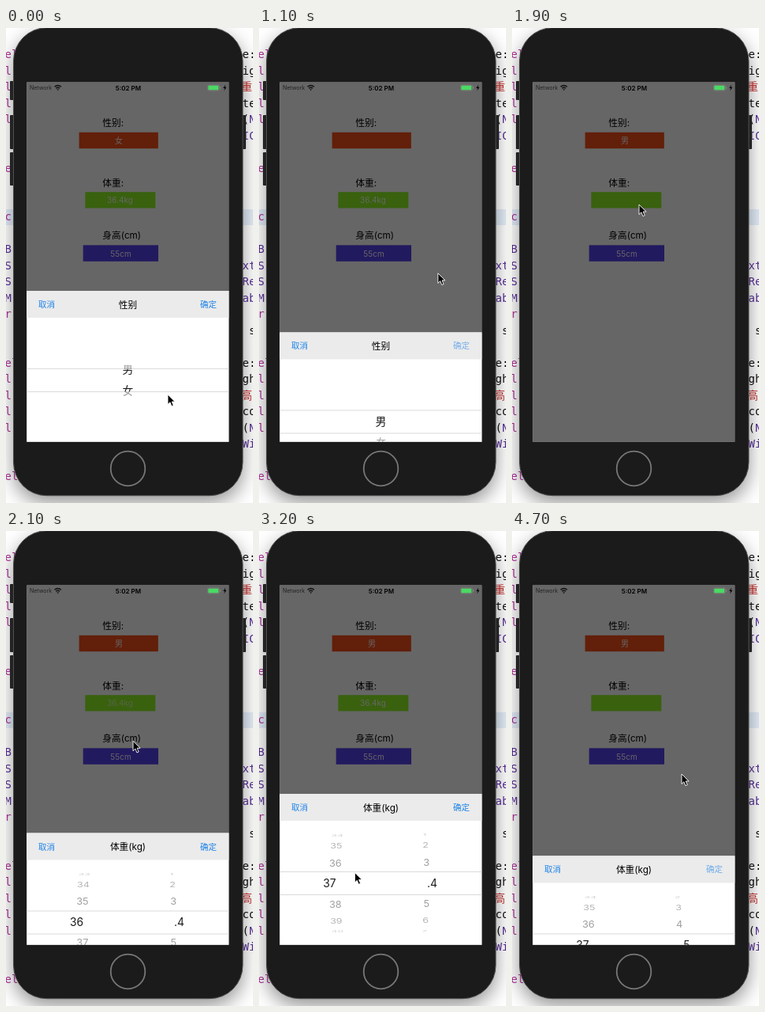
An HTML page that plays this animation: 313x600 px, repeating every 4.8 s.

```html
<!DOCTYPE html>
<html lang="zh">
<head>
<meta charset="utf-8">
<title>Picker demo</title>
<style>
  html, body { margin: 0; width: 100%; height: 100%; overflow: hidden; background: #fff; }
  svg { display: block; width: 100vw; height: 100vh; }
  text { font-family: Inter, "Noto Sans CJK SC", "Noto Sans CJK", sans-serif; white-space: pre; }
  .code text { font: 500 14px "DejaVu Sans Mono", "Noto Sans CJK SC", "Noto Sans CJK", monospace; }
  .mid { text-anchor: middle; }
  .label { font-size: 11.7px; }
  .value { font-size: 10px; fill: #fff; text-anchor: middle; }
  .action { font-size: 10.5px; fill: #1b82e8; }
</style>
</head>
<body>
<svg viewBox="0 0 313 600" xmlns="http://www.w3.org/2000/svg">
  <defs>
    <filter id="shadow" x="-20%" y="-10%" width="140%" height="125%" color-interpolation-filters="sRGB">
      <feDropShadow dx="0" dy="9" stdDeviation="12" flood-color="#000" flood-opacity=".42"/>
    </filter>
    <clipPath id="screen"><rect x="26.300" y="68.500" width="256" height="454.200"/></clipPath>
    <clipPath id="band"><rect x="26" y="431" width="257" height="28"/></clipPath>
    <clipPath id="offBand"><path d="M26 366h257v65H26zM26 459h257v64H26z"/></clipPath>
  </defs>

  <rect width="313" height="600" fill="#fff"/>
  <rect y="229" width="313" height="20" fill="#e4eefa"/>
  <g class="code" id="code"></g>

  <g fill="#2c2c2c">
    <rect x="5" y="67" width="6" height="24" rx="1"/>
    <rect x="5" y="110" width="6" height="43" rx="1"/>
    <rect x="5" y="157" width="6" height="42" rx="1"/>
    <rect x="298" y="110" width="6" height="43" rx="1"/>
  </g>
  <rect x="9.500" y="-.3" width="290.500" height="591" rx="42" fill="#1b1b1b" stroke="#505050" filter="url(#shadow)"/>
  <circle cx="154.500" cy="556.500" r="21.800" fill="none" stroke="#777" stroke-width="1.800"/>

  <g clip-path="url(#screen)">
    <rect x="26" y="68" width="257" height="455" fill="#fff"/>
    <g class="label">
      <text x="122.300" y="123.500">性别:</text>
      <text x="122.300" y="199.500">体重:</text>
      <text x="122.300" y="266">身高(cm)</text>
    </g>
    <rect x="92.600" y="131.800" width="100.200" height="20.400" fill="#f54d18"/>
    <rect x="100.400" y="207.200" width="88.900" height="20.300" fill="#8ef422"/>
    <rect x="97.700" y="274.300" width="95.300" height="20.500" fill="#5540ee"/>
    <text id="gender" class="value" x="143" y="146"></text>
    <text id="weight" class="value" x="144.500" y="221"></text>
    <text class="value" x="145.500" y="288.500">55cm</text>
    <rect id="dim" x="26" y="68" width="257" height="455" opacity=".6"/>

    <text x="30" y="78.300" font-size="7" fill="#222">Network</text>
    <path d="M61.500 74.300q4.200-3.700 8.400 0M63.300 76.200q2.400-2 4.800 0" fill="none" stroke="#111" stroke-width="1.500"/>
    <path d="M64.300 77.400h2.800l-1.400 1.700z"/>
    <text class="mid" x="155" y="78.500" font-size="8" font-weight="600">5:02 PM</text>
    <rect x="255.500" y="72" width="15" height="7" rx="1.500" fill="none" stroke="#888" stroke-width=".5"/>
    <rect x="256.300" y="72.800" width="13" height="5.400" rx=".8" fill="#4bd964"/>
    <path d="M271.600 74.300v2.400" stroke="#888"/>
    <path d="M278.200 71.500l-3 4.500h2l-1 3.500 3.200-4.700h-2z"/>

    <g id="sheet">
      <rect x="26" y="332" width="257" height="191" fill="#fff"/>
      <rect x="26" y="332" width="257" height="34" fill="#ebebeb"/>
      <text class="action" x="41" y="353">取消</text>
      <text id="title" class="label mid" x="154.500" y="353.500"></text>
      <text id="confirm" class="action" x="246" y="353">确定</text>
      <path d="M26 430.500h257M26 459.500h257" stroke="#dadada"/>
      <g id="outer" clip-path="url(#offBand)"></g>
      <g id="inner" clip-path="url(#band)"></g>
    </g>
  </g>

  <path id="cursor" d="M0 0v12.500l2.900-2.700 2 4.900 2.300-1-2-4.700h3.900z" fill="#000" stroke="#fff" stroke-width=".9" stroke-linejoin="round"/>
</svg>
<script>
const LOOP = 4800, STEP = 100, CENTER_X = 154.5, CENTER_Y = 444.7, SHEET_H = 191;
const $ = id => document.getElementById(id);

// Editor text peeking out at both sides of the phone.
const pink = '#b0309a', violet = '#5a3099', ink = '#111', red = '#c9302c';
const codeLine = (x, row, text, color) =>
  `<text x="${x}" y="${(38 + row * 20.5).toFixed(1)}" fill="${color}">${text}</text>`;
const leftRows = { 0: 'el', 1: 'l', 2: 'l', 3: 'l', 4: 'l', 7: 'e', 10: 'c', 16: 'r',
  19: 'el', 20: 'l', 21: 'l', 22: 'l', 23: 'l', 26: 'el' };
const leftTypes = { 12: 'B', 13: 'S', 14: 'S', 15: 'M' };
const rightRows = { 0: 'e:', 1: 'ig', 3: 'te', 4: '(', 17: ' s', 19: 'e:', 20: 'gh', 22: 'co', 23: '(' };
const rightTypes = { 4: ' N', 5: 'IC', 13: 'xt', 14: 'Re', 15: 'ab', 23: ' N', 24: 'Wi' };
const rightStrings = { 2: '重', 21: '高' };
const column = (x, rows, color) =>
  Object.entries(rows).map(([row, text]) => codeLine(x, +row, text, color)).join('');
$('code').innerHTML = column(-1.5, leftRows, pink) + column(-1.5, leftTypes, violet) +
  column(299.5, rightRows, ink) + column(299.5, rightTypes, violet) + column(298, rightStrings, red);

// Eased interpolation through [time, ...values] keys.
function track(t, keys) {
  if (t <= keys[0][0]) return keys[0].slice(1);
  for (let i = 1; i < keys.length; i++) {
    const [a, ...from] = keys[i - 1], [b, ...to] = keys[i];
    if (t <= b) {
      const p = (t - a) / (b - a), e = p * p * (3 - 2 * p);
      return from.map((v, k) => v + (to[k] - v) * e);
    }
  }
  return keys[keys.length - 1].slice(1);
}

const pointer = [[0, 205, 463], [200, 206, 473], [800, 252, 348], [950, 252, 348],
  [1300, 188, 251], [1600, 161, 223], [1950, 161, 223], [2400, 161, 386],
  [2750, 102, 462], [3100, 102, 430], [3500, 226, 440], [3900, 237, 389], [4050, 237, 389],
  [4350, 254, 348], [4500, 254, 348], [4700, 215, 307], [4900, 170, 240]];
const genderPos = [[-300, 1], [300, 0]];
const kiloPos = [[2750, 36], [3250, 37]];
const gramPos = [[3500, 4], [3950, 5.04], [4150, 5]];
const sheetShift = [[1000, 0], [1290, SHEET_H], [1900, SHEET_H], [2200, 0], [4568, 0], [4868, SHEET_H]];
const confirmAlpha = [[800, 1], [850, .15], [950, .15], [1250, 1],
  [4350, 1], [4450, .15], [4560, .15], [4830, 1]];
const genderAlpha = [[940, 1], [960, 0], [1100, 0], [1350, 1]];
const weightAlpha = [[1780, 1], [1850, 0], [1950, 0], [2200, 1], [4540, 1], [4570, 0], [4720, 0], [4900, 1]];

const wheelText = (x, y, sx, sy, size, label, alpha) =>
  `<text class="mid" transform="translate(${x.toFixed(2)} ${y.toFixed(2)}) scale(${sx.toFixed(3)} ${sy.toFixed(3)})"` +
  ` y=".36em" font-size="${size}" opacity="${alpha.toFixed(2)}">${label}</text>`;

// Rows sit on a cylinder; the middle band shows a magnified flat copy.
function wheel(side, pos, first, last, labelOf) {
  let outer = '', inner = '';
  for (let i = Math.max(first, Math.ceil(pos - 3.6)); i <= Math.min(last, pos + 3.6); i++) {
    const d = i - pos, angle = d * 24 * Math.PI / 180, depth = Math.cos(angle);
    const persp = 1 - .07 * (1 - depth);
    outer += wheelText(CENTER_X + side * 58 * persp, CENTER_Y + 64 * Math.sin(angle),
      persp, depth, 12.8, labelOf(i), .4 * Math.max(depth, 0) ** .7);
    if (Math.abs(d) < 1)
      inner += wheelText(CENTER_X + side * 65, CENTER_Y + d * 27, 1, 1, 13.8, labelOf(i), .9);
  }
  return { outer, inner };
}

function draw(t) {
  const genderOpen = t < 1290, open = genderOpen || t >= 1900;
  const [x, y] = track(t, pointer);
  $('cursor').setAttribute('transform', `translate(${x} ${y})`);
  $('gender').textContent = t < 960 ? '女' : '男';
  $('gender').setAttribute('opacity', track(t, genderAlpha)[0]);
  $('weight').textContent = t < 4570 ? '36.4kg' : '37.5kg';
  $('weight').setAttribute('opacity', track(t, weightAlpha)[0]);
  $('dim').setAttribute('visibility', open ? 'visible' : 'hidden');
  $('sheet').setAttribute('visibility', open ? 'visible' : 'hidden');
  $('sheet').setAttribute('transform', `translate(0 ${track(t, sheetShift)[0]})`);
  $('confirm').setAttribute('opacity', track(t, confirmAlpha)[0]);
  $('title').textContent = genderOpen ? '性别' : '体重(kg)';

  const dotted = t < 4050 ? 4 : 5;
  const wheels = genderOpen
    ? [wheel(0, track(t, genderPos)[0], 0, 1, i => '男女'[i])]
    : [wheel(-1, track(t, kiloPos)[0], 0, 200, i => i),
       wheel(1, track(t, gramPos)[0], 0, 9, i => i === dotted ? '.' + i : i)];
  $('outer').innerHTML = wheels.map(w => w.outer).join('');
  $('inner').innerHTML = wheels.map(w => w.inner).join('');
}

const start = performance.now();
function tick() {
  const t = (performance.now() - start) % LOOP;
  draw(Math.floor(t / STEP) * STEP);
  requestAnimationFrame(tick);
}
tick();
</script>
</body>
</html>
```
